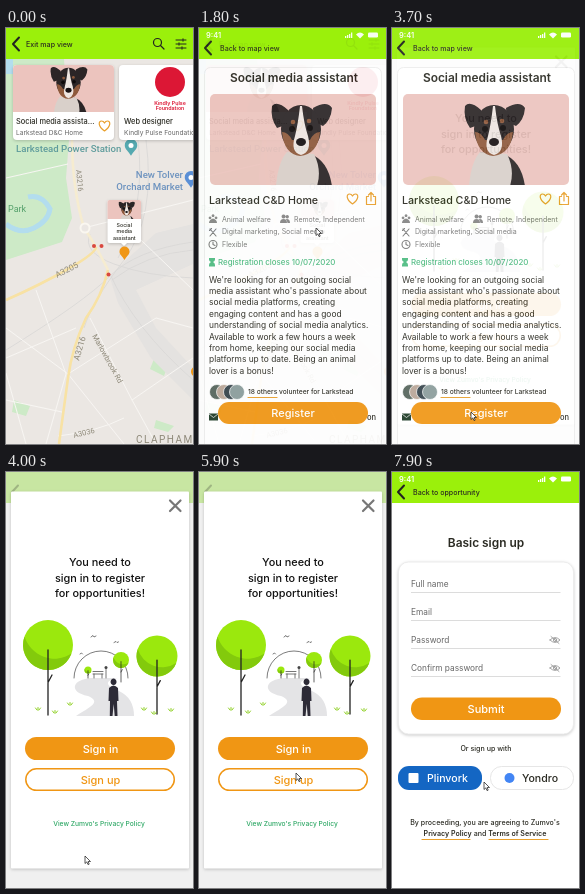
Recreate the animation shown at these times as an HTML page. Size 187 by 416 pixels, loop 8000 ms.

```html
<!DOCTYPE html>
<html lang="en">
<head>
<meta charset="utf-8">
<title>Volunteer sign up flow</title>
<style>
  html, body { margin: 0; width: 100%; height: 100%; overflow: hidden; background: #fff; }
  svg { display: block; width: 187px; height: 416px; }
  text { font: 500 7.1px Inter, "Open Sans", sans-serif; fill: #2a2a22; }
  .mid { text-anchor: middle; }
  .h1 { font-size: 11.9px; font-weight: 600; }
  .btn { font-size: 11px; text-anchor: middle; fill: #fff; }
  .ask { font-size: 10.9px; text-anchor: middle; fill: #111; }
  .meta { font-size: 7px; font-weight: 400; fill: #777; }
  .org { font-size: 6.6px; font-weight: 400; fill: #666; }
  .body { font-size: 8.4px; font-weight: 400; }
  .field { font-size: 8.3px; font-weight: 400; fill: #666; }
  .tag { font-size: 5.3px; text-anchor: middle; }
  .logo { fill: #dc1735; font-weight: 600; }
  .map text { font-family: Roboto, sans-serif; font-size: 7.5px; font-weight: 400; fill: #8d8878; }
  .map .place { font-size: 9.6px; font-weight: 500; }
  .line { fill: none; stroke: #222; stroke-linecap: round; stroke-linejoin: round; }
  .gold { stroke: #e9a02c; stroke-width: 1.2; }
  .orange { fill: #f09614; }
  .green { fill: #9bf00b; }
  .pink { fill: #ecc4be; }
  .soft { filter: drop-shadow(0 1px 1.5px #0003); }
  .gray { fill: #858585; }
</style>
</head>
<body>
<svg viewBox="0 0 187 416">
  <defs>
    <g id="dog">
      <path fill="#2b2526" d="M92 92L100 60Q118 66 122 92Z"/>
      <path fill="#d9d0ca" d="M66 92Q68 68 77 58L104 60Q112 76 107 92Z"/>
      <path fill="#2b2526" d="M78 16Q67 6 62 12Q60 24 67 34L78 30ZM103 14Q117 6 122 14Q121 26 113 32L104 28Z"/>
      <ellipse fill="#2b2526" cx="91" cy="35" rx="20" ry="24"/>
      <path fill="#8f5a3c" d="M72 38Q74 60 90 62Q108 60 110 38Q104 38 100 46H82Q78 38 72 38Z"/>
      <path fill="#eee6e1" d="M90 12Q88 30 85 42Q80 58 91 61Q102 58 98 42Q94 30 92 12Z"/>
      <g fill="#8f5a3c"><circle cx="83" cy="28" r="2.3"/><circle cx="99" cy="27" r="2.3"/></g>
      <ellipse fill="#171213" cx="91" cy="48" rx="5" ry="4"/>
      <g fill="#0d0909"><circle cx="82" cy="35" r="3"/><circle cx="100" cy="34" r="3"/></g>
    </g>
    <path id="heart" class="line gold" d="M0 5C-7 0-6-5-3-5Q-1-5 0-3Q1-5 3-5C6-5 7 0 0 5Z"/>
    <path id="back" class="line" stroke-width="2" d="M6-6.5L0 0L6 6.5"/>
    <g id="status">
      <text x="7" y="10" style="font-size:7.5px;font-weight:600;fill:#fff">9:41</text>
      <path fill="#fff" d="M146 8h1.3v2h-1.3zM148 7h1.3v3H148zM150 6h1.3v4H150zM152 4.5h1.3v5.5H152zM157 6.5Q161 2.5 165 6.5L161 10.5Z"/>
      <rect x="169" y="4.5" width="10" height="5" rx="1.3" fill="#fff"/>
    </g>
    <g id="eye" class="line" style="stroke:#999" stroke-width=".9">
      <path d="M-5 0Q0-5 5 0Q0 5-5 0ZM-4-3.5L4 3.5"/><circle r="1.6"/>
    </g>
    <path id="pin" d="M0 7C-2 3-5 2-5-1.5A5 5 0 0 1 5-1.5C5 2 2 3 0 7Z"/>
    <clipPath id="cardPic"><path d="M7 84V41q0-4 4-4h93q4 0 4 4v43z"/></clipPath>
    <clipPath id="pinPic"><path d="M101.500 191V174q0-2 2-2h29.500q2 0 2 2v17z"/></clipPath>
    <clipPath id="bigPic"><rect x="11" y="66" width="166" height="91" rx="5"/></clipPath>
  </defs>

  <g class="map">
    <path fill="#ebe7e3" d="M0 0H187V416H0Z"/>
    <path fill="#cdeac7" d="M0 31H58L63 112L60 150L66 190L56 214L0 232Z"/>
    <path fill="#cdeac7" d="M150 326L164 332L158 348L144 341ZM8 372L24 378L20 388L6 384ZM150 392L168 398L162 404L148 400Z"/>
    <path fill="none" stroke="#b3ddee" stroke-width="5" d="M0 196Q14 207 28 200T44 181Q36 166 22 169"/>
    <path fill="#b3ddee" d="M0 31H7V46H0Z"/>
    <path fill="#e4e2e0" d="M187 196L150 205L120 232L104 250L112 275L145 330L187 372V340L150 300L130 262L187 236Z"/>
    <g fill="none" stroke="#d9d7d6" stroke-width=".8">
      <path d="M140 112Q150 190 118 232T78 300M187 214Q130 222 104 248T0 322M187 250Q140 248 108 236T84 206M104 246Q128 300 187 352M132 112Q140 180 112 230M187 222Q140 226 106 252"/>
    </g>
    <g fill="none" stroke="#f8f6f3" stroke-width="1">
      <path d="M0 150L62 136M78 200L187 172M20 416L0 345M0 300L62 346L118 416M62 346L150 290L187 300M84 290L126 372L150 416M30 262L60 346L40 416M126 372L187 330M112 190L187 262M0 330L70 300M0 372L56 384M52 408Q90 404 118 390"/>
    </g>
    <g fill="none" stroke-width="2.6">
      <path stroke="#f6ecd0" d="M66 110Q66 160 78 200Q88 214 102 242"/>
      <path stroke="#f8e2a4" d="M0 272Q34 257 62 241T90 219M102 242Q96 268 80 290Q66 320 62 350T53 416"/>
    </g>
    <circle cx="79" cy="200" r="4.5" fill="#ebe7e3" stroke="#faf7f0" stroke-width="2"/>
    <text transform="translate(70 142) rotate(84)">A3216</text>
    <text transform="translate(51 250) rotate(-27)" style="font-size:8.5px">A3205</text>
    <text transform="translate(73 333) rotate(-74)" style="font-size:8.5px">A3216</text>
    <text transform="translate(86 308) rotate(61)">Marlowbrook Rd</text>
    <text transform="translate(68 410) rotate(-14)">A3036</text>
    <text x="130" y="415" style="font-size:10px;letter-spacing:1.5px">CLAPHAM</text>
    <text x="2" y="184" style="font-size:9px;fill:#55a06b">Park</text>
    <g fill="#d9483f"><circle cx="88" cy="218" r="2"/><circle cx="95.5" cy="218" r="2"/><circle cx="102.5" cy="246.5" r="2"/></g>
    <text class="place" x="10" y="124" style="fill:#5f9c9c">Larkstead Power Station</text>
    <use href="#pin" transform="translate(125 119) scale(1.25)" fill="#55a9b0"/><circle cx="125" cy="117.500" r="2.5" fill="#fff"/>
    <g style="text-anchor:end">
      <text class="place" x="177" y="150" style="fill:#6d93bf">New Tolver</text>
      <text class="place" x="177" y="162" style="fill:#6d93bf">Orchard Market</text>
    </g>
    <use href="#pin" transform="translate(185 151) scale(1.25)" fill="#5a8fd6"/><circle cx="185" cy="149.5" r="2.5" fill="#fff"/>
    <use href="#pin" x="190" y="345" class="orange"/>
  </g>
  <g>
    <path class="green" d="M0 0H187V31H0Z"/>
    <use href="#back" x="7" y="16"/>
    <text x="20" y="18.5">Exit map view</text>
    <g class="line" stroke-width="1.2">
      <circle cx="151.5" cy="14.5" r="4"/><path d="M154.5 17.5L158 21"/>
      <path stroke-width="1" d="M170 12H180M170 16H180M170 20H180M177 10.8V13.2M173 14.8V17.2M176 18.8V21.2"/>
    </g>
    <g class="soft" fill="#fff"><rect x="7" y="37" width="101" height="75" rx="4"/><rect x="113" y="37" width="101" height="75" rx="4"/></g>
    <g clip-path="url(#cardPic)"><path class="pink" d="M7 37H108V84H7Z"/><use href="#dog" transform="translate(7 33) scale(.61)"/></g>
    <text x="10" y="96" style="font-size:7.4px">Social media assista...</text>
    <text class="org" x="10" y="106.5">Larkstead D&amp;C Home</text>
    <use href="#heart" x="98.5" y="98"/>
    <circle cx="164" cy="54" r="15" class="logo"/>
    <text class="tag logo" x="164" y="76.5">Kindly Pulse</text>
    <text class="tag logo" x="164" y="82">Foundation</text>
    <text x="118" y="96" style="font-size:7.4px">Web designer</text>
    <text class="org" x="118" y="106.5">Kindly Pulse Foundation</text>

    <path class="soft" fill="#fff" d="M103.500 172H133q2 0 2 2V213q0 2-2 2H121L118 218L115 215H103.500q-2 0-2-2V174q0-2 2-2z"/>
    <g clip-path="url(#pinPic)"><path class="pink" d="M101 172H135V191H101Z"/><use href="#dog" transform="translate(96 171) scale(.27)"/></g>
    <text class="tag" x="118.3" y="198.5">Social</text>
    <text class="tag" x="118.3" y="205">media</text>
    <text class="tag" x="118.3" y="211.5">assistant</text>
    <use href="#pin" class="orange" x="118.5" y="225"/>
  </g>

  <g id="detail">
    <path fill="#fdfdfd" d="M0 0H187V416H0Z"/>
    <path class="green" d="M0 0H187V31H0Z"/>
    <use href="#status"/><use href="#back" x="6" y="20"/>
    <text x="21" y="22.5">Back to map view</text>
    <rect x="5.5" y="39.5" width="177" height="390" rx="6" fill="#fff" stroke="#ededed"/>
    <text class="h1 mid" x="95" y="54">Social media assistant</text>
    <g clip-path="url(#bigPic)"><path class="pink" d="M11 66H177V157H11Z"/><use href="#dog" x="11" y="66"/></g>
    <text x="10" y="176" style="font-size:10.7px;font-weight:500">Larkstead C&amp;D Home</text>
    <use href="#heart" x="153.5" y="171"/>
    <path class="line gold" d="M169.5 168.5H167.5V176.5H176.5V168.5H174.5M172 173V164.5M169.5 167L172 164.5L174.5 167"/>
    <g class="gray">
      <path d="M10 195Q10 191.500 14 190.500Q18 191.500 18 195ZM11 188.500a1.400 1.400 0 1 0 .1 0M14 186.300a1.400 1.400 0 1 0 .1 0M17 188.500a1.400 1.400 0 1 0 .1 0"/>
      <path d="M81 195Q81 191 84.5 191T88 195ZM88.5 195Q88 192 86.8 191.2Q91 190.5 91 195ZM84.5 186.5a2 2 0 1 0 .1 0M88.2 187a1.7 1.7 0 1 0 .1 0"/>
    </g>
    <g class="line" style="stroke:#777" stroke-width="1.1">
      <path d="M11 208L17 201M11 201L17 208M10.5 202.5L12.5 200.5"/>
      <circle cx="14" cy="216.5" r="4"/><path d="M14 214V216.5L16 217.5"/>
    </g>
    <text class="meta" x="23" y="193.5">Animal welfare</text>
    <text class="meta" x="95" y="193.5">Remote, Independent</text>
    <text class="meta" x="23" y="206">Digital marketing, Social media</text>
    <text class="meta" x="23" y="219">Flexible</text>
    <path fill="#4dbb81" d="M10 230h6v1.5Q16 233 14 234Q16 235 16 237v1.5h-6V237Q10 235 12 234Q10 233 10 231.5z"/>
    <text x="19" y="236.5" style="font-size:7.9px;fill:#4dbb81">Registration closes 10/07/2020</text>
    <g id="about"></g>
    <g stroke="#fff" stroke-width=".7">
      <circle cx="18" cy="364" r="7.5" fill="#55645c"/><circle cx="25" cy="364" r="7.5" fill="#b9a697"/>
      <circle cx="32" cy="364" r="7.5" fill="#35434a"/><circle cx="38" cy="364" r="7.5" fill="#8a9c9b"/>
    </g>
    <text x="49" y="366" style="font-size:6.7px">18 others volunteer for Larkstead</text>
    <path class="line gold" d="M49 369.5H78"/>
    <path fill="#1d3a26" d="M10 385.5h9v7h-9z"/><path class="line" style="stroke:#fff" stroke-width=".7" d="M10 386L14.5 389.5L19 386"/>
    <text x="168" y="391.5" style="font-size:7.5px">on</text>
    <rect class="orange" x="19" y="374" width="150" height="22" rx="11"/>
    <text class="btn" x="94" y="388.5">Register</text>
  </g>

  <g id="prompt">
    <path fill="#f0f0f0" d="M0 0H187V416H0Z"/>
    <path fill="#c8e6a2" d="M0 0H187V31H0Z"/>
    <use href="#back" x="6" y="20" opacity=".25"/>
    <rect x="5" y="19.5" width="178" height="377" rx="1" fill="#fff" class="soft"/>
    <path class="line" style="stroke:#777" stroke-width="2.2" d="M164 28.5L174.5 39M174.5 28.5L164 39"/>
    <text class="ask" x="94" y="94">You need to</text>
    <text class="ask" x="94" y="109.5">sign in to register</text>
    <text class="ask" x="94" y="125">for opportunities!</text>
    <path fill="#e4e4e6" d="M70 244C84 235 96 230 82 224C62 220 66 207 86 206H112C97 209 100 214 113 219Q128 226 128 244Z"/>
    <path class="line" stroke-width=".6" d="M68 206A27 27 0 0 1 122 206M85 165l2-1.500l1 1.500l2-1M108 170.500l2-1l1 1l1.500-.6M74 182l1.500-1l1 1"/>
    <g id="trees"></g>
    <path class="line" style="stroke:#555" stroke-width=".8" d="M87 199.5H97M87 202H97M88 202V206M96 202V206M100 196V206"/>
    <circle cx="100" cy="195.5" r="1.5" fill="#444"/>
    <path fill="#2d2b37" d="M107.5 206.5a3 3.3 0 1 0 .1 0M103 216Q107.5 211 112 216L112.5 229H111L111.5 244H108.7L107.7 232L106.5 244H103.8L104 229H102.5Z"/>
    <rect class="orange" x="19" y="265" width="150" height="23" rx="11.5"/>
    <text class="btn" x="94.5" y="280.5">Sign in</text>
    <rect x="19.8" y="296.8" width="148.5" height="21.5" rx="10.7" fill="#fff" stroke="#f09614" stroke-width="1.5"/>
    <text class="btn" x="94.5" y="311.5" style="fill:#f09614">Sign up</text>
    <text class="mid" x="93" y="354" style="font-size:6.7px;fill:#2fa866">View Zumvo's Privacy Policy</text>
  </g>

  <g id="signup">
    <path fill="#fff" d="M0 0H187V416H0Z"/>
    <path class="green" d="M0 0H187V31H0Z"/>
    <use href="#status"/><use href="#back" x="6" y="20"/>
    <text x="21" y="22.5">Back to opportunity</text>
    <text class="h1 mid" x="94" y="75">Basic sign up</text>
    <rect x="6.5" y="90" width="175" height="172" rx="10" fill="#fff" stroke="#ececec" class="soft"/>
    <g id="fields"></g>
    <use href="#eye" x="163" y="168"/><use href="#eye" x="163" y="196"/>
    <rect class="orange" x="19" y="225.5" width="150" height="22.5" rx="11"/>
    <text class="btn" x="94" y="240.5">Submit</text>
    <text class="mid" x="94" y="279">Or sign up with</text>
    <rect x="6" y="294" width="84" height="24" rx="11" fill="#1466c3"/>
    <rect x="16.5" y="301" width="10" height="10" rx="1" fill="#fff"/>
    <text x="35" y="310" style="font-size:10.6px;fill:#fff">Plinvork</text>
    <rect x="98.5" y="294.5" width="83" height="23" rx="11" fill="#fff" stroke="#e6e6e6"/>
    <circle cx="117.5" cy="306" r="5" fill="#4285f4"/>
    <text x="130" y="310" style="font-size:10.6px">Yondro</text>
    <text class="mid" x="93" y="353">By proceeding, you are agreeing to Zumvo's</text>
    <text class="mid" x="93" y="363.5"><tspan font-weight="600">Privacy Policy</tspan> and <tspan font-weight="600">Terms of Service</tspan></text>
    <path class="line gold" d="M30 367.5H78M97 367.5H156"/>
  </g>

  <g id="cursor"><path fill="#fff" stroke="#222" stroke-width=".75" d="M0 0V7.5L1.8 5.9L3 8.6L4.2 8.1L3.1 5.5H5.5Z"/></g>
</svg>
<script>
const LOOP = 8000;
const $ = id => document.getElementById(id);

const about = [
  "We're looking for an outgoing social", "media assistant who's passionate about",
  "social media platforms, creating", "engaging content and has a good",
  "understanding of social media analytics.", "Available to work a few hours a week",
  "from home, keeping our social media", "platforms up to date. Being an animal",
  "lover is a bonus!"
];
$("about").innerHTML = about.map((s, i) =>
  `<text class="body" x="10" y="${254.5 + i * 11.4}">${s}</text>`).join("");

$("fields").innerHTML = ["Full name", "Email", "Password", "Confirm password"].map((s, i) => {
  const y = 114.5 + i * 28;
  return `<text class="field" x="19" y="${y}">${s}</text>
    <path stroke="#d4d4d4" stroke-width=".8" d="M19 ${y + 6}H168.5"/>`;
}).join("");

// Each tree: centre x, centre y, crown radius, foot of the trunk.
const trees = [[42, 173, 25, 243], [151, 184, 20.5, 242], [115, 188, 8, 210], [82, 198, 3.5, 206]];
const tufts = [[31, 238], [48, 241], [63, 233], [137, 238], [147, 242], [164, 239]];
$("trees").innerHTML = trees.map(([x, y, r, foot]) => `
  <circle cx="${x}" cy="${y}" r="${r}" fill="#9be80d"/>
  <path fill="#83ca0c" d="M${x - r} ${y}A${r} ${r} 0 0 0 ${x + r} ${y}A${r * 1.25} ${r * 1.25} 0 0 1 ${x - r} ${y}Z" transform="rotate(20 ${x} ${y})"/>
  <path class="line" stroke-width="${r > 10 ? 1.3 : 0.7}" d="M${x} ${y + r * 0.2}V${foot}M${x} ${y + r * 1.5}l${r * 0.16} ${-r * 0.3}"/>`).join("") +
  tufts.map(([x, y]) =>
    `<path class="line" style="stroke:#83ca0c" stroke-width=".9" d="M${x} ${y}l-1.5-2M${x + 1} ${y}v-2.5M${x + 2} ${y}l1.5-2"/>`).join("");

function play(id, steps, frame) {
  const keys = steps.map(([ms, ...v]) => ({ offset: ms / LOOP, ...frame(...v) }));
  $(id).animate(keys, { duration: LOOP, iterations: Infinity });
}

const fadeIn = (id, from, to) =>
  play(id, [[0, 0], [from, 0], [to, 1], [LOOP, 1]], opacity => ({ opacity }));

fadeIn("detail", 1550, 1820);
fadeIn("prompt", 3680, 3950);
fadeIn("signup", 6550, 6800);

play("cursor", [
  [0, 192, 322], [300, 192, 322], [1000, 117, 200], [1850, 117, 200],
  [2500, 113, 216], [2800, 113, 216], [3500, 79, 384], [4050, 79, 384],
  [4500, 96, 300], [4600, 97, 301], [6480, 97, 301], [6600, 92, 310], [LOOP, 92, 310]
], (x, y) => ({ transform: `translate(${x}px, ${y}px)`, easing: "ease-in-out" }));
</script>
</body>
</html>
```
